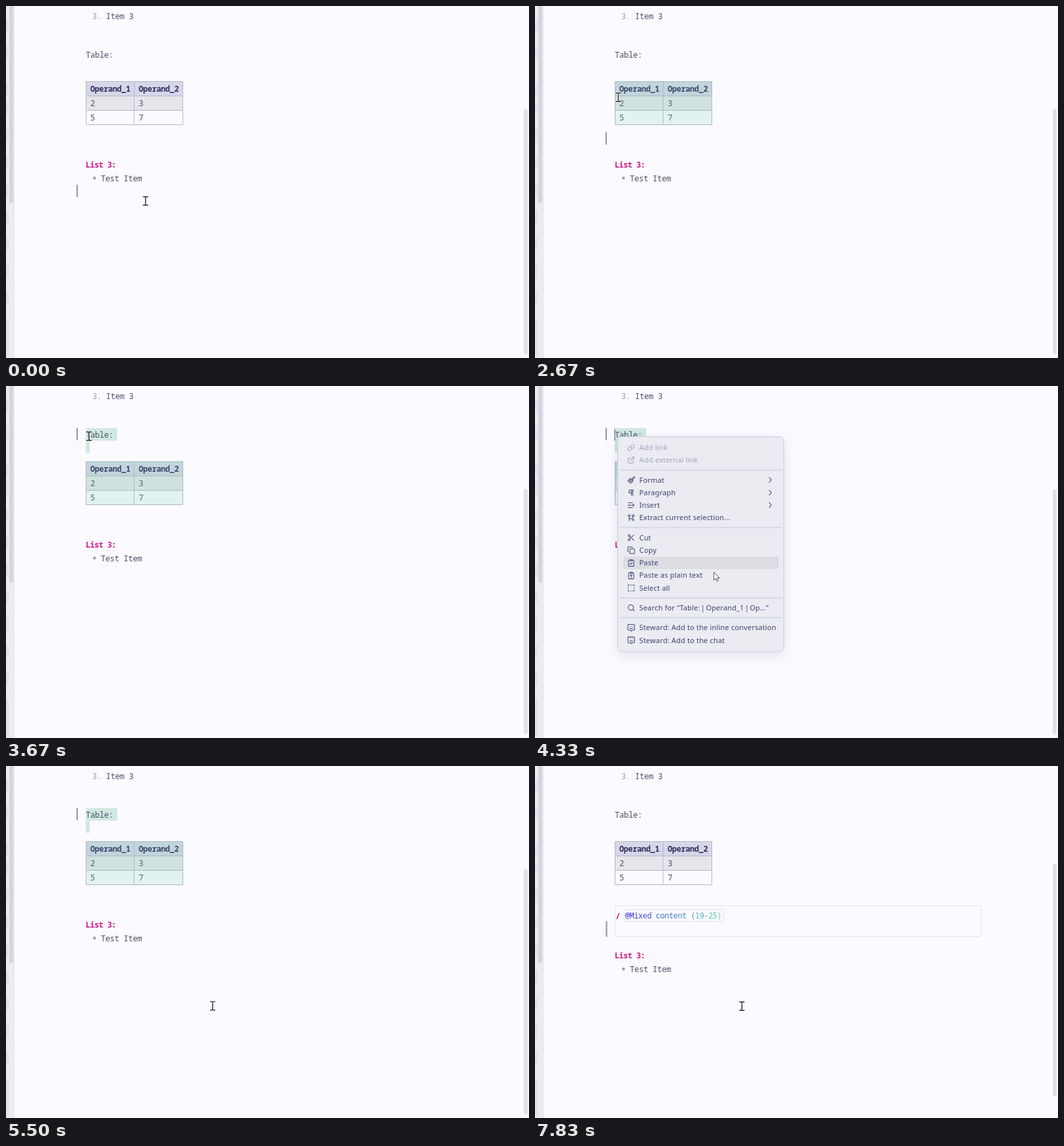
Recreate the animation shown at these times as an HTML page. Size 800x538 px, loop 8 s.

```html
<!DOCTYPE html>
<html lang="en">
<head>
<meta charset="utf-8">
<title>Editor: selection to inline command</title>
<style>
  html, body { margin: 0; width: 100%; height: 100%; overflow: hidden; background: #fbfaff; }
  svg { display: block; width: 800px; height: 538px; }
  text { font: 12.2px "Noto Sans Mono", monospace; letter-spacing: -.32px; fill: #4c4f69; white-space: pre; }
  .head { font-size: 11.8px; font-weight: 700; fill: #2b2c5e; letter-spacing: -.28px; }
  .pink { font-size: 12px; font-weight: 700; fill: #cf1a8b; letter-spacing: -.6px; }
  .faint { fill: #9a9cb6; }
  .grid { fill: none; stroke: #b4b7cb; }
  .bar { fill: #8f91ad; }
  .sel { fill: #d0e8e0; }
  .menu text { font: 11px "Noto Sans", sans-serif; letter-spacing: .18px; fill: #3f416e; }
  .menu .off text { fill: #a3a4bf; }
  .icon { fill: none; stroke: #3f416e; stroke-width: 2; stroke-linecap: round; stroke-linejoin: round; }
  .menu .chevron { stroke-width: 1.1; }
  .off .icon { stroke: #a3a4bf; }
  .panel { fill: #ebecf2; stroke: #c9ccda; filter: drop-shadow(0 5px 9px rgba(60, 60, 90, .13)); }
</style>
</head>
<body>
<svg viewBox="0 0 800 538">
  <defs>
    <linearGradient id="mention" gradientUnits="userSpaceOnUse" x1="138" x2="287" y1="0" y2="0">
      <stop stop-color="#3a2bd4"/><stop offset=".5" stop-color="#3a80cc"/><stop offset="1" stop-color="#62d2b0"/>
    </linearGradient>
  </defs>
  <rect width="800" height="538" fill="#fbfaff"/>
  <rect width="13" height="538" fill="#ebecf2"/>
  <path d="M12.5 0V538" stroke="#e2e3ec"/>
  <g id="minimap" fill="#e2e2e9"></g>
  <rect x="5" y="-10" width="6" height="311" rx="3" fill="#d4d5dd"/>
  <rect id="scroll" x="792" width="6" rx="3" fill="#e0e0e8"/>

  <g class="sel">
    <rect id="selTitle" x="122" y="64.5" width="48" height="19"/>
    <rect id="selBlank" x="122" y="83" width="6" height="19"/>
  </g>
  <text x="132" y="20" class="faint">3.</text>
  <text x="153" y="20">Item 3</text>
  <text x="122" y="78.5">Table:</text>

  <rect x="122.5" y="115.5" width="148" height="22" fill="#d6d7e7"/>
  <rect x="122.5" y="137.5" width="148" height="22" fill="#e6e5ea"/>
  <path class="grid" d="M122.5 115.5h148v66h-148zM122.5 137.5h148M122.5 159.5h148M196 115.5v66"/>
  <text x="129" y="131" class="head">Operand_1</text>
  <text x="203" y="131" class="head">Operand_2</text>
  <text x="129" y="153">2</text><text x="203" y="153">3</text>
  <text x="129" y="174.5">5</text><text x="203" y="174.5">7</text>
  <rect id="selTable" x="122" y="115" width="149" height="67" fill="rgba(100,200,165,.17)"/>

  <g id="command">
    <rect id="commandBox" x="122.5" y="213.5" width="560" rx="3" fill="none" stroke="#e3e3eb"/>
    <text x="123" y="233.5" class="pink" style="font-size:13px">/</text>
    <rect x="136.5" y="219.5" width="152" height="18" rx="3" fill="none" stroke="#dedfe9"/>
    <text x="138" y="233" style="font-size:11.7px;fill:url(#mention)">@Mixed content (19-25)</text>
  </g>
  <g id="list">
    <text x="122" y="247" class="pink">List 3:</text>
    <circle cx="135.3" cy="263" r="2.2" fill="#9a9cb6"/>
    <text x="145" y="267.5">Test Item</text>
  </g>
  <rect id="bar" class="bar" width="2"/>

  <g id="menu" class="menu">
    <path d="M122 65.5v18" stroke="#4c4f69"/>
    <rect class="panel" x="126.5" y="77.5" width="254" height="328.5" rx="6"/>
    <path d="M130 128.5H378M130 216.5H378M130 324H378M130 354H378" stroke="#d0d3e2" stroke-width="1.5"/>
    <rect id="hover" x="135" width="238" height="19" rx="3" fill="#dcdde3"/>
  </g>

  <g id="beam" fill="none">
    <path d="M-4-6.5h3l1 1 1-1h3M0-6V6M-4 6.5h3l1-1 1 1h3" stroke="#fff" stroke-width="3"/>
    <path d="M-4-6.5h3l1 1 1-1h3M0-6V6M-4 6.5h3l1-1 1 1h3" stroke="#222" stroke-width="1.4"/>
  </g>
  <path id="arrow" d="M0 0V12.3L2.8 9.6 4.8 14 6.8 13.1 4.9 8.9H8.8z" fill="#fff" stroke="#55565f"/>
</svg>
<script>
const $ = id => document.getElementById(id);
const TICK = 1000 / 6, TICKS = 48;

// Icons are drawn in a 24 x 24 box.
const clipboard = 'M8 4H6a2 2 0 0 0-2 2v14a2 2 0 0 0 2 2h12a2 2 0 0 0 2-2V6a2 2 0 0 0-2-2h-2M9 2h6v4H9z';
const icons = {
  link: 'M10 13a5 5 0 0 0 7.5.5l3-3a5 5 0 0 0-7-7L12 5M14 11a5 5 0 0 0-7.5-.5l-3 3a5 5 0 0 0 7 7L12 19',
  external: 'M15 3h6v6M10 14 21 3M18 13v6a2 2 0 0 1-2 2H5a2 2 0 0 1-2-2V8a2 2 0 0 1 2-2h6',
  brush: 'M14 9l5-6a2 2 0 0 1 3 3l-6 5M9 7l9 8-3 3-9-8zM7 10 2 14l8 8 5-5M6 17l2-2',
  pilcrow: 'M13 4v16M17 4v16M19 4H9.5a4.5 4.5 0 0 0 0 9H13',
  insert: 'M3 5h13M3 12h9M3 19h13M18 9v6M15 12h6',
  branch: 'M6 9v12M9 6a3 3 0 1 0-6 0 3 3 0 0 0 6 0M21 6a3 3 0 1 0-6 0 3 3 0 0 0 6 0M18 9a9 9 0 0 1-9 6H6M18 15v6M15 18h6',
  scissors: 'M9 6a3 3 0 1 0-6 0 3 3 0 0 0 6 0M9 18a3 3 0 1 0-6 0 3 3 0 0 0 6 0M20 4 8 16M14.5 14.5 20 20M8 8l4 4',
  copy: 'M10 8h10a2 2 0 0 1 2 2v10a2 2 0 0 1-2 2H10a2 2 0 0 1-2-2V10a2 2 0 0 1 2-2zM4 16a2 2 0 0 1-2-2V4a2 2 0 0 1 2-2h10a2 2 0 0 1 2 2',
  paste: clipboard + 'M9 14l2 2 4-4',
  plain: clipboard + 'M9 12v-1h6v1M11 17h2M12 11v6',
  all: 'M3 5V3h2M9 3h1M14 3h1M19 3h2v2M21 9v1M21 14v1M21 19v2h-2M15 21h-1M10 21H9M5 21H3v-2M3 15v-1M3 10V9',
  search: 'M19 11a8 8 0 1 0-16 0 8 8 0 0 0 16 0M17 17l4 4',
  chat: 'M4 2h16a2 2 0 0 1 2 2v13a2 2 0 0 1-2 2h-5l-3 3-3-3H4a2 2 0 0 1-2-2V4a2 2 0 0 1 2-2zM9 7.5v.5M15 7.5v.5M8 13q4 2.5 8 0'
};
const rows = [
  [94, 'link', 'Add link', 'off'],
  [113, 'external', 'Add external link', 'off'],
  [143.5, 'brush', 'Format', 'sub'],
  [163, 'pilcrow', 'Paragraph', 'sub'],
  [182, 'insert', 'Insert', 'sub'],
  [201.3, 'branch', 'Extract current selection...'],
  [231.7, 'scissors', 'Cut'],
  [251, 'copy', 'Copy'],
  [270.2, 'paste', 'Paste'],
  [289.4, 'plain', 'Paste as plain text'],
  [308.6, 'all', 'Select all'],
  [339, 'search', 'Search for “Table:&#8202;|&#8202;Operand_1&#8202;|&#8202;Op…”'],
  [369.4, 'chat', 'Steward: Add to the inline conversation'],
  [388.6, 'chat', 'Steward: Add to the chat']
];
$('menu').insertAdjacentHTML('beforeend', rows.map(([y, icon, label, kind]) => `
  <g class="${kind || ''}">
    <path class="icon" transform="translate(141 ${y - 6}) scale(.51)" d="${icons[icon]}"/>
    <text x="159.5" y="${y + 4}">${label}</text>
    ${kind === 'sub' ? `<path class="icon chevron" d="M358.3 ${y - 3.6}l3.3 3.6-3.3 3.6"/>` : ''}
  </g>`).join(''));

$('minimap').innerHTML = [20, 61, 118, 146, 188, 230, 272, 313, 354, 396, 437, 479, 500, 515]
  .map(y => `<rect y="${y}" width="4" height="19.5"/>`).join('');

// Pointer stops: tick, x, y
const stops = [
  [0, 213.5, 298], [1, 213.5, 298], [7, 152.5, 209], [9, 152.5, 209], [12, 128, 203],
  [14, 128, 203], [18, 127, 76], [23, 127, 77], [24, 180, 165], [25, 245, 268],
  [26, 273.5, 284.5], [28, 308, 352], [30, 316, 366.5], [TICKS, 316.5, 367]
];
function pointer(tick) {
  const i = Math.max(1, stops.findIndex(s => s[0] >= tick));
  const [t0, x0, y0] = stops[i - 1], [t1, x1, y1] = stops[i];
  const p = (tick - t0) / (t1 - t0);
  return [x0 + (x1 - x0) * p, y0 + (y1 - y0) * p];
}

const show = (id, on) => $(id).setAttribute('visibility', on ? 'visible' : 'hidden');
const span = (id, top, bottom) => {
  $(id).setAttribute('y', top);
  $(id).setAttribute('height', bottom - top);
};
const move = (id, x, y) => $(id).setAttribute('transform', `translate(${x} ${y})`);

function draw(tick) {
  const [x, y] = pointer(tick);
  const menuOpen = tick >= 23 && tick < 33;
  const inserted = tick >= 34, newLine = tick >= 41;
  const selecting = tick >= 14 && !inserted;
  const reach = tick >= 18 ? 76 : y;
  const title = selecting && reach < 84, blank = selecting && reach < 104;

  show('selTitle', title);
  show('selBlank', blank);
  show('selTable', selecting && reach < 182);
  show('command', inserted);
  $('commandBox').setAttribute('height', newLine ? 47 : 28);
  move('list', 0, newLine ? 47.3 : inserted ? 28 : 0);

  const line = newLine ? [237, 261] : inserted ? [218, 245]
    : title ? [64, 83] : blank ? [84, 103] : tick >= 12 ? [193, 212] : [273, 292];
  span('bar', ...line);
  $('bar').setAttribute('x', inserted ? 108.4 : 107.8);
  span('scroll', ...(newLine ? [149, 505] : inserted ? [152, 516] : [157.5, 532]));

  show('menu', menuOpen);
  // The highlight trails the pointer by one tick.
  const hoverY = pointer(Math.max(0, tick - 1))[1];
  const row = rows.find(r => Math.abs(r[0] - hoverY) <= 9.7);
  show('hover', menuOpen && tick > 23 && row);
  if (row) span('hover', row[0] - 9.5, row[0] + 9.5);

  show('beam', !menuOpen);
  show('arrow', menuOpen);
  move('beam', x, y);
  move('arrow', x, y);
}

function frame() {
  draw(Math.floor((performance.now() + 5) / TICK) % TICKS);
  requestAnimationFrame(frame);
}
frame();
</script>
</body>
</html>
```
